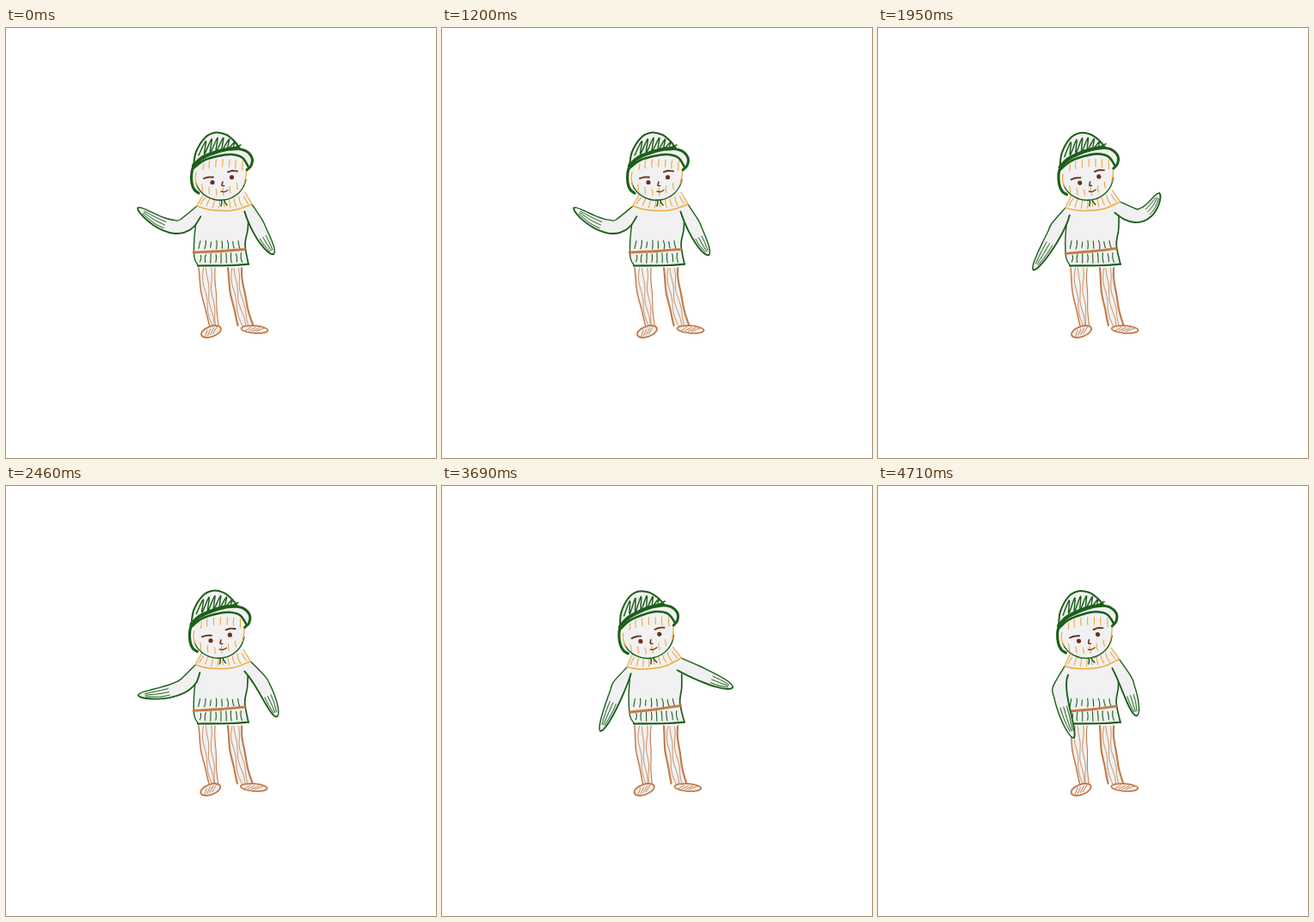
Write an HTML page that moves like this. It is 500 by 500 pixels and loops after 4.74 s.

```html
<!DOCTYPE html>
<html lang="en">
<head>
<meta charset="utf-8">
<title>Waving figure</title>
<style>
html, body { margin: 0; width: 100%; height: 100%; overflow: hidden; background: #fff; }
svg { display: block; width: 100vw; height: 100vh; }
path { stroke-linecap: round; stroke-linejoin: round; }
</style>
</head>
<body>
<svg id="stage" viewBox="0 0 500 500"></svg>
<script>
const GREEN = '#1c5f1a', BROWN = '#c47a48', ORANGE = '#f0a83c', DARK = '#6b3020', SKIN = '#f1f1f1';
const LOOP = 4740, STEP = 30, CYCLE = 1080, HOLD = 110;
const { PI, sin, cos, min, max, sqrt, hypot } = Math;
const stage = document.getElementById('stage');

function add(parent, tag, attrs = {}) {
  const el = document.createElementNS('http://www.w3.org/2000/svg', tag);
  for (const name in attrs) el.setAttribute(name, attrs[name]);
  return parent.appendChild(el);
}
const group = () => add(stage, 'g');
const parse = text => text.split(' ').map(pair => pair.split(',').map(Number));
const range = (n, fn) => Array.from({ length: n }, (_, i) => fn(i, n > 1 ? i / (n - 1) : 0));
const mix = (a, b, u) => a + (b - a) * u;

let seed = 7;
const jitter = size => {
  seed = (seed * 16807) % 2147483647;
  return (seed / 2147483647 - 0.5) * 2 * size;
};

// Smooth curve through points
function smooth(pts, start = 'M') {
  const f = n => n.toFixed(2);
  let d = `${start}${f(pts[0][0])} ${f(pts[0][1])}`;
  for (let i = 0; i < pts.length - 1; i++) {
    const a = pts[i - 1] || pts[i], b = pts[i], c = pts[i + 1], e = pts[i + 2] || c;
    d += `C${f(b[0] + (c[0] - a[0]) / 6)} ${f(b[1] + (c[1] - a[1]) / 6)} ` +
      `${f(c[0] - (e[0] - b[0]) / 6)} ${f(c[1] - (e[1] - b[1]) / 6)} ${f(c[0])} ${f(c[1])}`;
  }
  return d;
}
const path = (parent, color, width, d, fill = 'none') =>
  add(parent, 'path', { d, stroke: color, 'stroke-width': width, fill });
const line = (parent, color, width, text) => path(parent, color, width, smooth(parse(text)));

// A row of short knit strokes; place(u) gives the middle, (dx, dy) the half length
function knit(parent, color, n, place, dx, dy) {
  range(n, (i, u) => {
    const [x, y] = place(u), h = dy + jitter(dy * 0.25), lean = dx(u);
    path(parent, color, 1.1, smooth([[x - lean, y - h], [x + jitter(1), y], [x + lean, y + h]]));
  });
}

const legs = group(), torso = group(), beltG = group(), rightG = group(), leftG = group();
const collar = group(), head = group();

// Trouser leg from x = a..b at the top, its sides drifting by da and db
function leg(a, b, da, db, wa, wb) {
  const side = (u, wave) => range(8, (i, v) =>
    [mix(a + da * v ** 1.6, b + db * v ** 1.6, u) + wave * sin(v * 11 + u * 9), 279 + 67 * v]);
  const left = side(0, 0.4), right = side(1, 0.4);
  add(legs, 'path', { d: smooth(left) + smooth(right.slice().reverse(), 'L') + 'Z', fill: SKIN });
  path(legs, BROWN, wa, smooth(left));
  path(legs, BROWN, wb, smooth(right));
  range(3, i => path(legs, BROWN, 0.8, smooth(side((i + 1) / 4, 1.1))));
}
function shoe(x, y, rx, ry, turn) {
  const g = add(legs, 'g', { transform: `translate(${x} ${y}) rotate(${turn})` });
  add(g, 'ellipse', { rx, ry, fill: SKIN, stroke: BROWN, 'stroke-width': 1.8 });
  range(4, (i, u) => path(g, BROWN, 0.9,
    smooth([[mix(-0.7, 0.1, u) * rx, ry * 0.5], [mix(-0.3, 0.7, u) * rx, -ry * 0.5]])));
}
leg(224, 243, 13, 4, 1.5, 1.1);
leg(258, 274, 12, 13, 2.1, 2.1);
shoe(238.5, 353, 12, 6, -20);
shoe(289, 350.5, 15.5, 4.3, 4);

// Sweater
add(torso, 'path', {
  d: 'M224 207L222 218C223 236 216 243 220 258L219 270Q219 276 224 277L282 275L278 255Q280 240 282 224L284 206Z',
  fill: SKIN
});
line(torso, GREEN, 1.4, '222,219 219,244 219,267 224,277');
line(torso, GREEN, 2.2, '223,276.5 262,276 282,274.5');
line(torso, GREEN, 1.7, '282,219 281,235 278,252 282,275');
knit(torso, GREEN, 9, u => [mix(226, 274, u), 268 - u], u => u - 0.5, 5);
knit(torso, GREEN, 8, u => [mix(225, 271, u), 252], u => mix(-1, 1, u), 4);
line(beltG, BROWN, 2.8, '218,260.8 250,259.5 278,257.3');

// Collar
path(collar, 'none', 0, smooth(parse('229,193 222,207 254,212.5 286,205 277,190')) + 'Z', SKIN);
line(collar, ORANGE, 1.5, '222,207 238,211.5 264,212 286,205');
line(collar, ORANGE, 1.1, '230,193 222,207');
line(collar, ORANGE, 1.1, '278,191 286,205');
knit(collar, ORANGE, 9, u => [mix(229, 279, u), 201 - u + 4 * sin(PI * u)], u => mix(-2.5, 2.5, u), 4.5);
line(collar, GREEN, 1.5, '249,198 251,202 250,207');
line(collar, GREEN, 1.5, '257,196 254,201 257,206');

// Face
add(head, 'ellipse', { cx: 249.5, cy: 171, rx: 30, ry: 28.5, fill: SKIN });
path(head, GREEN, 1.4, 'M221 181A30 28.5 0 0 0 279 176');
line(head, ORANGE, 1.3, '221,168 220,175 222,183');
line(head, ORANGE, 1.3, '280,164 279,172 277,181');
knit(head, ORANGE, 7, u => [mix(229, 275, u), 160 - 3 * sin(PI * u)], () => -0.3, 4.5);
knit(head, ORANGE, 6, u => [mix(228, 269, u), 186 - 2 * u + 6 * sin(PI * u)], () => 0.3, 3.5);
line(head, DARK, 1.9, '230,175 235,173.5 241,173.5');
line(head, DARK, 1.9, '258,167.5 263,166 269,166.5');
for (const [x, y] of [[240, 179.5], [262.5, 173.5]]) add(head, 'circle', { cx: x, cy: y, r: 2.6, fill: DARK });
line(head, DARK, 1.6, '252,179 251,183 253.5,183.5');
line(head, DARK, 1.3, '250,190 254,190.5 258,188.5');

// Hat
path(head, 'none', 0, smooth(parse('217,163 222,143 233,126 244,121.5 258,126 271,139 285,149 285,162 268,148 245,150')) + 'Z', SKIN);
line(head, GREEN, 2, '218,161 221,144 232,127 244,121.5 256,124 265,131 272,140');
path(head, GREEN, 1.5, smooth(range(14, (i, u) =>
  [mix(224, 268, u) + (i % 2 ? 5 : 0), i % 2 ? 133 - 7 * sin(PI * u) + 3 * u : 148 - 10 * u])));
line(head, GREEN, 4.2, '218,160 228,151 242,145 257,141 270,140');
line(head, GREEN, 3, '268,140 279,143 286,151 285,160 280,165');
line(head, GREEN, 2.6, '218,163 230,154 246,149 262,147 275,151 282,162');
line(head, GREEN, 3.2, '219,158 216,168 216,180 219,188 224,192');

// One sleeve with hand; side tells which way its outer edge faces
function makeArm(parent, side, reach) {
  const pen = w => path(parent, GREEN, w, '');
  const fill = add(parent, 'path', { fill: SKIN });
  const outer = pen(1.4), inner = pen(1.9), folds = pen(1);
  const stops = range(10, (i, u) => sin(u * PI / 2));
  return (root, s, angle, length, bend) => {
    const dir = [-side * sin(angle), cos(angle)];
    const t = [0, 1].map(i => s[i] + dir[i] * length);
    const e = [0, 1].map(i => (s[i] + t[i]) / 2 - dir[i] * reach +
      side * bend * (i ? dir[0] : -dir[1]));
    const c = [0, 1].map(i => 2 * e[i] - (s[i] + t[i]) / 2);
    const at = (u, off) => {
      const v = 1 - u;
      const [x, y] = [0, 1].map(i => v * v * s[i] + 2 * u * v * c[i] + u * u * t[i]);
      const [dx, dy] = [0, 1].map(i => v * (c[i] - s[i]) + u * (t[i] - c[i]));
      const k = side * off / hypot(dx, dy);
      return [x - dy * k, y + dx * k];
    };
    const edge = sign => stops.map(u => at(u, sign * 8 * sqrt(1 - u ** 4)));
    const top = [root, ...edge(1).slice(2)], low = edge(-1);
    fill.setAttribute('d', smooth(top) + smooth(low.slice().reverse(), 'L') + 'Z');
    outer.setAttribute('d', smooth(top));
    inner.setAttribute('d', smooth(low));
    folds.setAttribute('d', [-4, -0.5, 3].map(o =>
      smooth([at(0.65, o * 1.1), at(0.78, o), at(0.93, o * 0.5)])).join(''));
  };
}
const leftArm = makeArm(leftG, 1, 11), rightArm = makeArm(rightG, -1, 3);

function draw(t) {
  // The swing starts after a short hold; each part comes to rest at its own point
  const turn = max(0, t - HOLD) / CYCLE * 2 * PI;
  const left = min(turn, 7 * PI), right = min(turn - PI / 6, 8 * PI);
  const sway = 0.75 + 0.25 * cos((t - 600) / 3600 * 2 * PI);
  const k = sway * (1 - cos(min(turn, 7.5 * PI))) / 2;

  const shear = (el, c, y) => el.setAttribute('transform', `matrix(1 0 ${c} 1 ${-c * y} 0)`);
  shear(legs, -0.07 * k, 278);
  shear(torso, 0.09 * k, 276);
  beltG.setAttribute('transform', `rotate(${-6 * k} 250 259)`);
  collar.setAttribute('transform', `translate(${-11 * k} ${-k}) rotate(${-12 * k} 254 208)`);
  head.setAttribute('transform', `translate(${-11 * k} 0) rotate(${-9.5 * k} 250 200)`);

  const rad = PI / 180, r = -12 * k * rad;
  const corner = (x, y) => [254 - 11 * k + x * cos(r) - y * sin(r), 208 - k + x * sin(r) + y * cos(r)];
  leftArm(corner(-32, -1), [219 - 11 * k, 216],
    (43 + 53 * cos(left)) * rad, 72 - 6 * cos(left), -5.5 - 12 * cos(left));
  rightArm(corner(32, -3), [285 - 12 * k, 211 - 6 * k],
    (72 - 52 * cos(right)) * rad, 58 + 9 * sin(right + PI / 6), -7 + 10 * cos(right - PI / 6));
}

const begin = performance.now();
function tick() {
  const t = (performance.now() - begin) % LOOP;
  draw(Math.floor(t / STEP) * STEP);
  requestAnimationFrame(tick);
}
tick();
</script>
</body>
</html>
```
